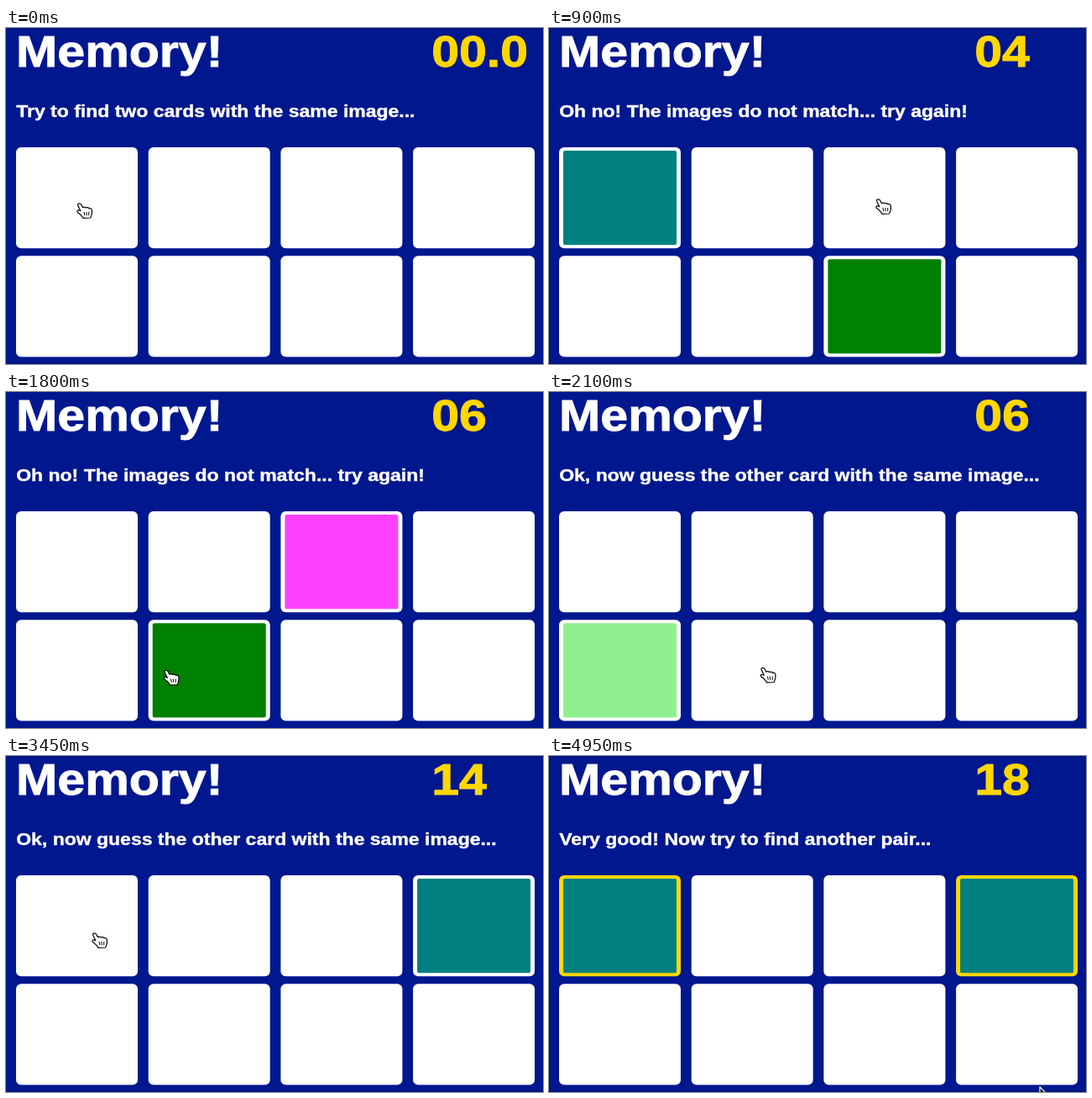
These frames come from a looping animation (640x400 px, 5100 ms). An HTML page:

```html
<!DOCTYPE html>
<html lang="en">
<head>
<meta charset="utf-8">
<title>Memory</title>
<style>
  html, body { margin: 0; width: 100%; height: 100%; overflow: hidden; background: #00178e; }
  svg { display: block; width: 640px; height: 400px; }
  text {
    font-family: "Liberation Sans", Arial, sans-serif; font-weight: bold;
    fill: currentColor; stroke: currentColor; color: #fff;
  }
  .big { font-size: 51.4px; stroke-width: .9px; }
  .small { font-size: 20px; stroke-width: .4px; }
  #timer { color: #ffd700; }
</style>
</head>
<body>
<svg viewBox="0 0 640 400">
  <rect width="640" height="400" fill="#00178e"/>
  <!-- the whole page is shown slightly widened -->
  <g transform="scale(1.15 1)">
    <text class="big" x="10.5" y="46">Memory!</text>
    <text class="big" id="timer" x="441" y="46"></text>
    <text class="small" x="10.6" y="106.5" id="message"></text>
  </g>
  <g id="cards"></g>
  <g id="cursor" stroke-linejoin="round">
    <g id="hand" stroke="#000" stroke-width="1.2">
      <path fill="#fff" d="M-1 .2Q1-.8 2.6 1.2L4.3 4.6Q6.5 3.4 8.3 5Q10.5 4 12 5.8Q15 5.3 15.4 8V11.5Q15 14 13.6 17L5.2 17.4Q3 13.4-1.8 10.2Q-2.8 7.6 0 8L1.8 8.8L-1.2 2.4Q-1.8 1-1 .2Z"/>
      <path fill="none" stroke-width="1" d="M6 10L6.8 14.2M8.8 10L9.3 14.2M11.7 10V14.2"/>
    </g>
    <path id="arrow" fill="#000" stroke="#fff" stroke-width="1.2" d="M0 0V16.5L3.8 13L6.5 19.3L9.4 18.1L6.7 12H11.8Z"/>
  </g>
</svg>
<script>
const LOOP = 5100, STEP = 150, TRAVEL = 300;
const CUT = 3150, CUT_SECONDS = 5, SECOND = 450;
const CARD = {width: 145, height: 120.3};
const GOLD = "#ffd700", WHITE = "#fff";
const TEAL = "#008080", GREEN = "#008000", PINK = "#ff40ff", LIME = "#90f090";
const DECK = [TEAL, LIME, PINK, TEAL, LIME, GREEN, GREEN, PINK];
const byId = id => document.getElementById(id);

const TEXT = {
  start: "Try to find two cards with the same image...",
  guess: "Ok, now guess the other card with the same image...",
  miss: "Oh no! The images do not match... try again!",
  match: "Very good! Now try to find another pair..."
};

// The pointer rests at x, y until the given time, clicks there and moves on.
const click = (until, x, y) => ({until, x, y, clicks: true});
const hover = (until, x, y) => ({until, x, y, clicks: false});
const STOPS = [
  click(150, 87, 209), click(600, 388, 320), click(1200, 392, 204),
  click(1650, 260, 326), click(1950, 121, 337), click(2550, 388, 320),
  hover(3000, 112, 224), click(3150, 550, 215), click(3600, 105, 211),
  hover(3900, 105, 211), hover(4650, 258, 245), hover(LOOP, 585, 394)
];

function addRect(x, y, width, height, rx) {
  const rect = document.createElementNS("http://www.w3.org/2000/svg", "rect");
  Object.entries({x, y, width, height, rx}).forEach(([k, v]) => rect.setAttribute(k, v));
  return byId("cards").appendChild(rect);
}

const cards = DECK.map((color, i) => {
  const x = 12 + 157.7 * (i % 4), y = 142 + 129.3 * Math.floor(i / 4);
  return {
    x, y, color,
    frame: addRect(x, y, CARD.width, CARD.height, 6),
    face: addRect(x + 5, y + 4, CARD.width - 10, CARD.height - 8, 2)
  };
});

const cardAt = ({x, y}) => cards.find(c =>
  x >= c.x && x <= c.x + CARD.width && y >= c.y && y <= c.y + CARD.height);

// Plays every click up to time t.
function gameAt(t) {
  let open = [], message = "start";
  for (const stop of STOPS.filter(s => s.clicks && s.until <= t)) {
    if (open.length === 2) open = [];
    open.push(cardAt(stop));
    if (open.length === 1) message = "guess";
    else message = open[0].color === open[1].color ? "match" : "miss";
  }
  return {open, message};
}

function pointerAt(t) {
  const i = STOPS.findIndex(s => s.until > t);
  if (i === 0) return STOPS[0];
  const from = STOPS[i - 1], to = STOPS[i];
  const k = Math.min(1, (t - from.until) / Math.min(TRAVEL, to.until - from.until));
  const ease = k * k * (3 - 2 * k);
  return {x: from.x + (to.x - from.x) * ease, y: from.y + (to.y - from.y) * ease};
}

function clockAt(t) {
  if (t === 0) return "00.0";
  const seconds = 2 + Math.floor(t / SECOND) + (t >= CUT ? CUT_SECONDS : 0);
  return String(seconds).padStart(2, "0");
}

function draw(time) {
  const t = Math.floor(time % LOOP / STEP) * STEP;
  const {open, message} = gameAt(t);
  const matched = card => message === "match" && open.includes(card);

  byId("message").textContent = TEXT[message];
  byId("timer").textContent = clockAt(t);
  for (const card of cards) {
    card.frame.setAttribute("fill", matched(card) ? GOLD : WHITE);
    card.face.setAttribute("fill", open.includes(card) ? card.color : WHITE);
  }

  const tip = pointerAt(t), over = cardAt(tip);
  const clickable = over && !matched(over);
  byId("cursor").setAttribute("transform", `translate(${tip.x} ${tip.y})`);
  byId("hand").setAttribute("visibility", clickable ? "visible" : "hidden");
  byId("arrow").setAttribute("visibility", clickable ? "hidden" : "visible");
}

const begin = performance.now();
function tick() {
  draw(performance.now() - begin);
  requestAnimationFrame(tick);
}
tick();
</script>
</body>
</html>
```
